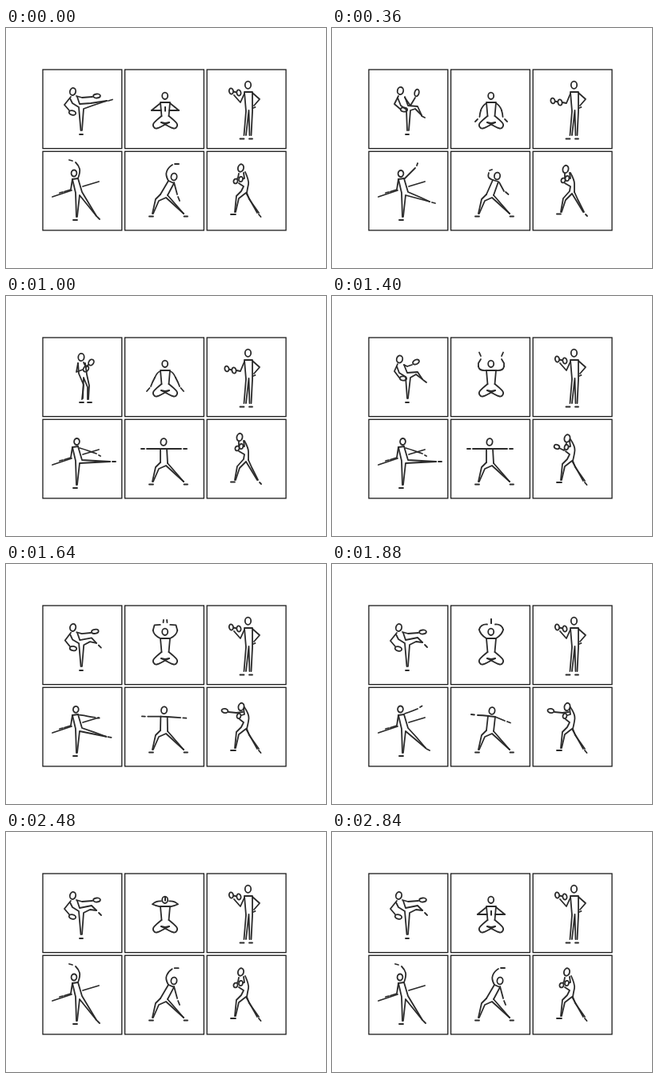
Animation, 400 px wide and 300 px high, one loop 2.92 s. Source, as an HTML page with a canvas:

```html
<!DOCTYPE html>
<html lang="en">
<head>
<meta charset="utf-8">
<title>Line figures exercising</title>
<style>
  html, body { margin: 0; width: 100%; height: 100%; overflow: hidden; background: #fff; }
  canvas { display: block; }
</style>
</head>
<body>
<canvas id="stage" width="400" height="300"></canvas>
<script>
const ctx = document.getElementById('stage').getContext('2d');
const LOOP = 2920, STEP = 40, LAST = 2840;

// Shapes: L = polyline, S = smooth line, O = ellipse (cx cy rx ry degrees).
const parse = text => text.split('|').filter(Boolean).map(part => {
  const [kind, ...nums] = part.trim().split(/\s+/);
  return { kind, nums: nums.map(Number) };
});

const figure = (fixed, keys, mirror = 0) => ({
  fixed: parse(fixed),
  keys: keys.map(([time, pose]) => ({ time, shapes: parse(pose) })),
  mirror
});

// Kickboxer
const kickBody = 'O 83.5 79.5 3.6 4.6 15|L 81 86 73 96 79 103|O 83 106 4.3 2.7 15|L 88 85 95 87 108 86|O 113.5 85 4.4 2.5 -5|L 80 88 83 94 91 99 93.5 128|L 92 133 96 133';
const kick = kickBody + '|L 89 86 92 95 106 94 126 91|L 95 128 97 101 108 97 126 91|L 128 91 133 89.5';
const chamber = kickBody + '|L 89 86 92 95 107 92 113 98|L 95 128 97 101 105 97 113 98|L 116 101 119 104';
const kneeUp = 'O 85.5 78.5 3.7 4.6 12|L 83 85 78 95 85 101|O 90 102 4.2 2.6 5|L 91 87 98 97 104 87|O 106 81 2.7 4.4 12|L 82 87 86 97 93 102 94 128|L 92 133 96 133|L 91 86 95 97 107 98 112 109|L 96 128 98 103 104 101 112 109|L 112 110 116 112';
const standGuard = 'O 94 76.5 3.7 4.6 5|L 90 84 88 95 96 92|O 100 91 3 4 35|L 97 83 100 89 103 86|O 106.5 83 3 4 35|L 90 84 91 97 97 111 95 129|L 92 133 97 133|L 99 84 101 98 104 112 103 129|L 96 128 97 102 102 114 102 129|L 102 133 107 133';
const kneeReach = 'O 84.5 79 3.7 4.6 13|L 82 85 78 94 84 102|O 89 103 4.2 2.6 5|L 90 86 94 88 100 86|O 105 82.5 4.2 2.7 -25|L 81 88 84 96 92 101 94 128|L 92 133 96 133|L 90 86 94 96 107 95 113 104|L 95 128 98 102 105 98 113 104|L 114 105 118 108';

// Meditation: one half, mirrored about the spine
const pray = 'S 193 94 188 98 182 103|L 182 103 188 103 194 103|L 199 99 199 103.5';
const armsLow = 'S 193 94 188 97 186 103|L 186 103 185 107 184.5 111|L 182 114 179 117';
const armsOut = 'S 193 94 189 95 186 102|L 186 102 183 108 181 113|L 179.5 115 176 119';
const armsSide = 'S 193 94 188 95 183 97|L 183 97 179 95 175 93|L 172 92 168 90';
const armsUp = 'S 193 93 184 94 183 88|L 183 88 183 84 186 79|L 186 75 184 70.5';
const overhead = 'S 193 93 185 88 184 82|S 184 82 186 75 194 75.5|L 199 69 199 74';

// Dumbbell curl
const curlUp = 'L 298 82 293 93 285 84|L 282 79 291 81|O 281.5 79 2.6 3.6 -10|O 291 81 2.6 3.6 -10';
const curlDown = 'L 298 82 293 94 288 93|L 276 91 285 93|O 276 91 2.6 3.4 -10|O 285 93 2.6 3.7 -10';

// Barre: arm, hand, leg and foot move
const barre = (head, arm, hand, thigh, toe, foot) =>
  `O ${head} 3.4 4 5|S ${arm}|L ${hand}|L 90 188 95 205 ${thigh} ${toe}|L 89 236 92 209 ${toe}|L ${foot}`;
const armOver = barre('85 181.5', '90 188 93 180 91 172 87 168', '83 166 79 165', '104 220', '113 235', '114 236 117 239');
const armRaised = barre('85 181.5', '90 188 92 182 92 175 91 169', '89 166 86 164.5', '104 220', '113 235', '114 236 117 239');
const armDiagonal = barre('86 182', '91 188 95 184 100 179 104 175', '106 172 107 169', '109 211', '122 217', '125 218 129 219');
const armForward = barre('88.5 182', '92 190 99 192 107 195 113 197', '116 199 118 200', '112 206', '130 207', '133 207 137 207');
const armMiddle = barre('85.5 181.5', '91 187 97 185 102 183 107 181', '110 179 112.5 177.5', '106 217', '117 230', '118 231 122 233');

// Warrior lunge and side bend
const lunge = (head, left, leftHand, right, rightHand, shoulderL, shoulderR) =>
  `O ${head} 3.6 4.4 10|S ${left}|L ${leftHand}|L ${right}|L ${rightHand}` +
  `|L ${shoulderL} 193 208|L ${shoulderL} ${shoulderR} 202 209`;
const sideBend = lunge('210 186', '203 191 199 184 203 174 208 171', '211 170 216 170', '210 193 214 208', '215 211 217 216', '203 191', '210 194');
const halfBend = lunge('206.5 185', '201 190 196 188 195 184 196 181', '197 178 200 177', '209 193 215 204', '217 205 220.5 208', '201 190', '208 192');
const backBend = lunge('207.5 185.5', '202 190 196 188 195 184 196 181', '198 177 202 176', '209 193 215 207', '216 209 218 214', '202 190', '209 192');
const slightBend = lunge('200 183.5', '196 190 191 189.5 186 189 182 189', '174 188 178 188.5', '204 191 216 196', '219 197 223 198.5', '195 190', '204 191');
const warrior = lunge('197 182.5', '193 191 187 191 181 191 176 191', '169 191 173 191', '201 191 219 191', '222 191 226 191', '193 191', '201 191');

// Boxer
const boxer = (head, arm, glove, rearGlove, back, front, rear, feet) =>
  `O ${head} 3.5 4.8 15|L ${arm}|L 297 181 298 188 ${rearGlove}|O ${rearGlove} 2.4 3.2 15|O ${glove}` +
  `|S ${back}|L ${front}|L ${rear}|L ${feet} `;
const guard = boxer('293.5 175', '291 182 290 187 287 191', '287 191.5 2.5 3 20', '293.5 189', '299 180 304 191 302 200 301 206',
  '291 194 297 198 294 204 288 210 286 230', '287 230 291 213 300 206 314 231', '281 233 287 233') +
  '|L 301 206 304 214 316 231|L 316 233 318.5 236';
const deepGuard = boxer('292 176.5', '291 182 291 187 289 190', '289 190.5 2.5 3 20', '294 188', '298 181 303 190 303 199 303 205',
  '291 194 298 198 297 204 289 213 286 230', '287 230 292 215 300 207 314 230', '281 232.5 286 232.5') +
  '|L 303 205 307 214 315 230|L 317 233 319 235';
const jab = boxer('294 178', '293 184 290 193 284 190', '281 188.5 3.4 2.6 20', '293 189', '298 179 304 188 303 198 301 206',
  '292 194 297 198 294 204 288 210 286 230', '287 230 291 213 300 206 314 231', '281 233 287 233') +
  '|L 301 206 304 214 316 231|L 316 233 318.5 236';
const punch = boxer('294 178.5', '296 185 288 186 278 185', '273.5 183.5 4 2.6 8', '291 190', '298 179 304 188 303 198 301 206',
  '292 194 297 198 294 204 288 210 286 230', '287 230 291 213 300 206 314 231', '281 233 287 233') +
  '|L 301 206 304 214 316 231|L 316 233 318.5 236';

const figures = [
  figure('', [[0, kick], [120, chamber], [360, kneeUp], [720, standGuard], [1040, standGuard], [1400, kneeReach], [1760, chamber], [LAST, chamber]]),
  figure('O 198.7 84.8 3.5 4.2 0|L 199 93 193 93 194.5 110|S 194.5 110 187 116 183 121 186 126 191 125 198 121 204 118|L 194 118 199 119',
    [[0, pray], [360, armsLow], [700, armsOut], [1000, armsOut], [1200, armsSide], [1400, armsUp], [1760, overhead], [2240, overhead], [2800, pray], [LAST, pray]], 199),
  figure('O 302.5 71.3 3.7 4.6 0|L 297.5 134 300 104 298 80 308 80 308 104 306.5 134|L 300 134 303.5 103 304.5 134|L 308 81 317 89 310 97|L 309 100 311.5 99|L 292.5 138.5 297.5 138.5|L 304 138.5 308 138.5',
    [[0, curlUp], [320, curlDown], [1040, curlDown], [1380, curlUp], [LAST, curlUp]]),
  figure('L 58 211 82 203|L 96 198 116 192|L 90 188 83 189 81 202 73 204.5|L 67 206 71 205|L 83 189 87 206 88 236|L 84 240 89 240',
    [[0, armOver], [360, armDiagonal], [760, armForward], [1440, armForward], [1880, armMiddle], [2200, armRaised], [2480, armOver], [LAST, armOver]]),
  figure('L 193 208 187 214 183 232|L 184 232 191 216 200 212 222 232|L 202 209 222 232|L 179 235.5 184 235.5|L 222.5 235.5 227 235.5',
    [[0, sideBend], [360, halfBend], [760, warrior], [1480, warrior], [1880, slightBend], [2200, backBend], [2520, sideBend], [LAST, sideBend]]),
  figure('', [[0, guard], [320, deepGuard], [1040, deepGuard], [1400, jab], [1600, punch], [1920, punch], [2180, guard], [LAST, guard]])
];

// Smooth interpolation that never overshoots a held pose.
function poseAt(keys, time) {
  let i = 0;
  while (i < keys.length - 2 && time >= keys[i + 1].time) i++;
  const a = keys[i], b = keys[i + 1], before = keys[i - 1], after = keys[i + 2];
  const span = b.time - a.time, u = (time - a.time) / span;
  return a.shapes.map((shape, s) => ({
    kind: shape.kind,
    nums: shape.nums.map((from, n) => {
      const value = key => key.shapes[s].nums[n];
      const slope = (p, q) => p && q ? (value(q) - value(p)) / (q.time - p.time) : 0;
      const tangent = (m, k) => m * k <= 0 ? 0 : 2 * m * k / (m + k);
      const mid = slope(a, b);
      const start = tangent(slope(before, a), mid), end = tangent(mid, slope(b, after));
      const v = 1 - u;
      return from * (1 + 2 * u) * v * v + value(b) * u * u * (3 - 2 * u) +
        span * u * v * (start * v - end * u);
    })
  }));
}

function drawShape({ kind, nums }) {
  ctx.beginPath();
  if (kind === 'O') {
    const [x, y, rx, ry, angle] = nums;
    ctx.ellipse(x, y, rx, ry, angle * Math.PI / 180, 0, Math.PI * 2);
    ctx.fill();
  } else {
    const end = nums.length - 2;
    ctx.moveTo(nums[0], nums[1]);
    for (let i = 2; i < end; i += 2) {
      const [x, y, nextX, nextY] = nums.slice(i, i + 4);
      if (kind === 'L') ctx.lineTo(x, y);
      else if (i + 2 === end) ctx.quadraticCurveTo(x, y, nextX, nextY);
      else ctx.quadraticCurveTo(x, y, (x + nextX) / 2, (y + nextY) / 2);
    }
    ctx.lineTo(nums[end], nums[end + 1]);
  }
  ctx.stroke();
}

function drawPanels() {
  ctx.strokeStyle = '#1c1c1c';
  ctx.lineWidth = 1.3;
  for (const y of [52, 154.3])
    for (const x of [46, 148.6, 251.2]) ctx.strokeRect(x, y, 98.8, 98.6);
}

function draw(now) {
  const time = Math.min(LAST, Math.floor(now % LOOP / STEP) * STEP);
  ctx.fillStyle = '#fff';
  ctx.fillRect(0, 0, 400, 300);
  drawPanels();
  ctx.strokeStyle = '#2b2b2b';
  ctx.lineWidth = 1.8;
  ctx.lineCap = ctx.lineJoin = 'round';
  for (const { fixed, keys, mirror } of figures) {
    const shapes = [...fixed, ...poseAt(keys, time)];
    shapes.forEach(drawShape);
    if (mirror) {
      ctx.save();
      ctx.translate(mirror * 2, 0);
      ctx.scale(-1, 1);
      shapes.filter(shape => shape.kind !== 'O').forEach(drawShape);
      ctx.restore();
    }
  }
  ctx.lineCap = 'butt';
  ctx.lineJoin = 'miter';
}

const started = performance.now();
function tick() {
  draw(performance.now() - started);
  requestAnimationFrame(tick);
}
tick();
</script>
</body>
</html>
```
